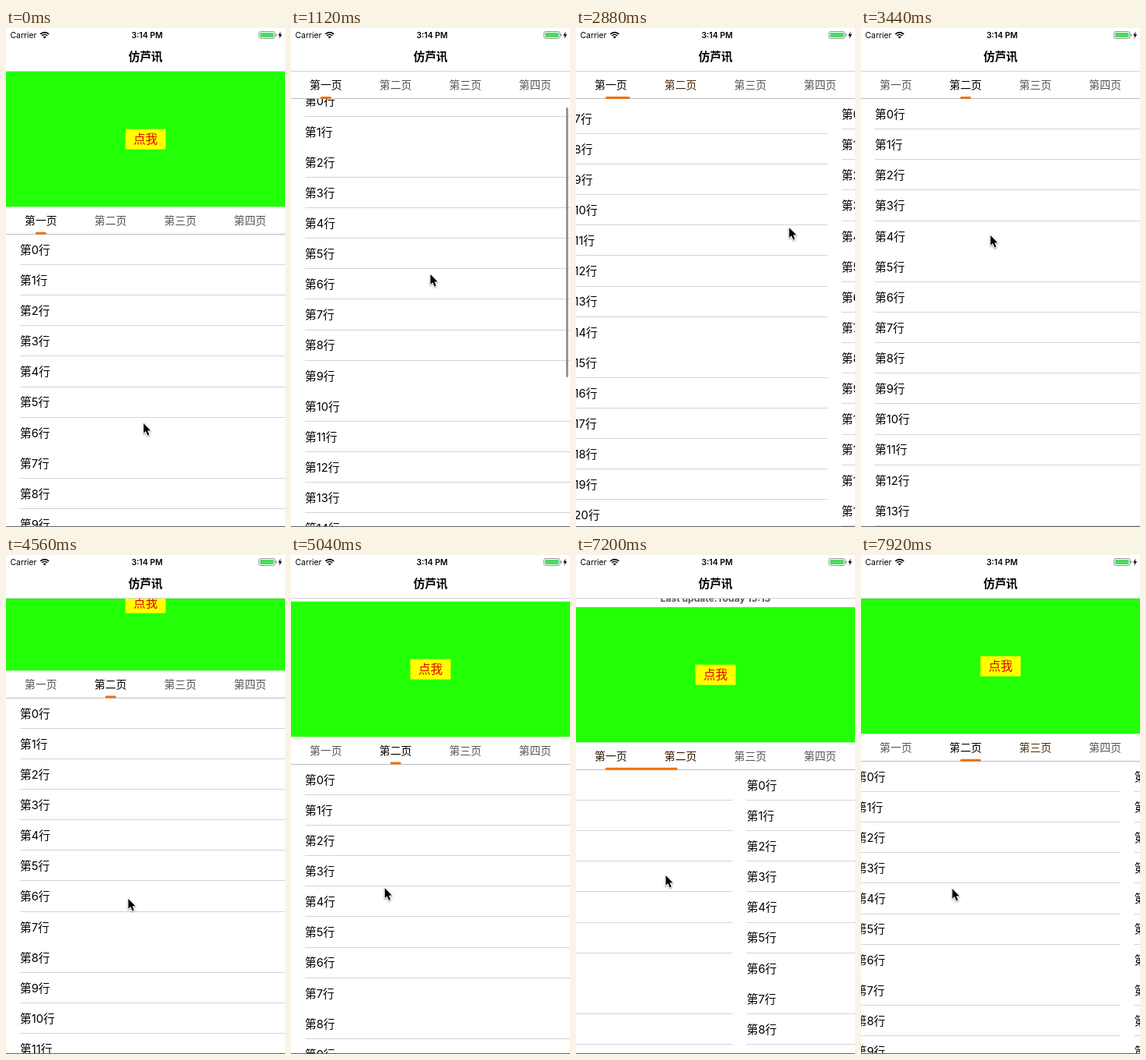
Recreate the animation shown at these times as an HTML page with a canvas. Size 359x640 px, loop 8000 ms.

```html
<!DOCTYPE html>
<html lang="zh-CN">
<head>
<meta charset="utf-8">
<style>
html, body { margin: 0; width: 100%; height: 100%; overflow: hidden; background: #fff; }
canvas { display: block; width: 359px; height: 640px; }
</style>
</head>
<body>
<canvas id="stage"></canvas>
<script>
const W = 359, H = 640, LOOP = 8000, STEP = 80;
const NAV = 55.8, HEAD = 173.75, TABS = 34.8, ROW = 39.13, ROWS = 30;
const FONT = '"Inter", "Noto Sans CJK SC", "Noto Sans CJK", sans-serif';
const TAB_NAMES = ['第一页', '第二页', '第三页', '第四页'];

const canvas = document.getElementById('stage');
const ctx = canvas.getContext('2d');
const dpr = window.devicePixelRatio || 1;
canvas.width = W * dpr;
canvas.height = H * dpr;

// Progress from 0 to 1 between two times, in several shapes.
const ramp = (t, a, b) => Math.min(1, Math.max(0, (t - a) / (b - a)));
const smooth = (t, a, b) => { const s = ramp(t, a, b); return s * s * (3 - 2 * s); };
const glide = (t, a, b) => 1 - (1 - ramp(t, a, b)) ** 3;
const bump = (t, a, b) => Math.sin(Math.PI * ramp(t, a, b));

// The header collapses first; what is left over scrolls the current list.
const SWITCH = 3400, FLING = 232;
function scroll(t) {
  if (t < SWITCH) return 349 * ramp(t, 160, 1920) + 93 * glide(t, 1920, 2640);
  return HEAD + FLING * smooth(t, 3560, 4000) - (HEAD + FLING) * ramp(t, 4000, 4700);
}

const overscroll = t => 12 * bump(t, 4700, 5080) + 11 * bump(t, 6900, 7500);

const pageAt = t => smooth(t, 2760, 3380) - smooth(t, 5860, 6180) +
  smooth(t, 6900, 7554) + 0.0705 * ramp(t, 7760, 7920);

// Stops of the mouse: time, x, y
const stops = [
  [160, 177, 507], [1920, 181.5, 157], [2760, 300, 255], [3380, 167.5, 261], [3560, 165, 276],
  [4000, 159, 117], [4700, 157, 522], [5680, 52.5, 249], [6000, 52.5, 249], [6900, 273, 398],
  [7200, 115.5, 411], [7760, 143, 427], [7920, 117.5, 428]
];

function pointerAt(t) {
  let [, x, y] = stops[0];
  for (let i = 1; i < stops.length; i++) {
    const [from, x0, y0] = stops[i - 1], [to, x1, y1] = stops[i];
    const k = ramp(t, from, to);
    x += (x1 - x0) * k;
    y += (y1 - y0) * k;
  }
  return [x, y];
}

function box(x, y, w, h, color) {
  ctx.fillStyle = color;
  ctx.fillRect(x, y, w, h);
}

function pill(x, y, w, h, r, color) {
  ctx.fillStyle = color;
  ctx.beginPath();
  ctx.roundRect(x, y, w, h, r);
  ctx.fill();
}

function label(str, x, cy, size, color, align = 'left', weight = 400) {
  ctx.font = `${weight} ${size}px ${FONT}`;
  ctx.textAlign = align;
  ctx.fillStyle = color;
  ctx.fillText(str, x, cy + size * 0.37);
}

// A hairline vanishes when it falls between two pixel rows.
function hairline(x, y) {
  const row = Math.floor(y);
  if (Math.abs(y - row - 0.26) > 0.06) box(x, row, W - 18, 1, '#d4d4d4');
}

function drawList(x, top, offset) {
  for (let i = 0; i < ROWS; i++) {
    const y = top + i * ROW - offset;
    if (y > H || y + ROW < top) continue;
    label(`第${i}行`, x + 18, y + 20, 14.74, '#000');
    hairline(x + 18, y + ROW);
  }
}

function drawLists(top, page, t) {
  const active = t < SWITCH ? 0 : 1;
  const offset = Math.max(0, scroll(t) - HEAD);
  ctx.save();
  ctx.beginPath();
  ctx.rect(0, top, W, H - top);
  ctx.clip();
  TAB_NAMES.forEach((_, i) => {
    const x = (i - page) * W;
    if (Math.abs(x) < W) drawList(x, top, i === active ? offset : 0);
  });
  const moving = scroll(t) !== scroll(t - 160);
  if (offset > 0 && moving) pill(354, top + 2.5 + offset * 0.543, 2.6, 346, 1.3, '#8a8a8a');
  ctx.restore();
}

function drawHeader(top) {
  if (top > NAV) label('Last update:Today 15:13', W / 2, top - 11.5, 12.1, '#5a5a5a', 'center', 700);
  box(0, top, W, HEAD, '#22ff06');
  box(W / 2 - 26, top + HEAD / 2 - 13, 52, 26, '#ffff00');
  label('点我', W / 2, top + HEAD / 2 - 0.5, 15.6, '#e00000', 'center');
}

function tabColor(weight) {
  if (weight > 0.999) return '#000';
  if (weight <= 0.001) return '#555';
  const k = 1 - weight;
  return `rgb(${85 * k}, ${46 * k}, ${6 * k})`;
}

function drawTabs(top, page) {
  const pitch = W / 4;
  box(0, top, W, TABS, '#fff');
  TAB_NAMES.forEach((name, i) => {
    const color = tabColor(Math.max(0, 1 - Math.abs(page - i)));
    label(name, pitch * (i + 0.5), top + 17.2, 13.87, color, 'center');
  });
  box(0, Math.floor(top + TABS), W, 1, '#bcbcbc');

  // The marker stretches ahead first, then its tail catches up.
  const from = Math.floor(page), p = page - from;
  const left = pitch * (from + 0.5 + Math.max(0, p * 2 - 1)) - 7;
  const right = pitch * (from + 0.5 + Math.min(1, p * 2)) + 7;
  pill(left, top + TABS - 2.7, right - left, 3, 1.5, '#f0700f');
}

function drawWifi(x, y) {
  ctx.strokeStyle = '#000';
  ctx.lineWidth = 1.7;
  for (const r of [4.9, 7.7]) {
    ctx.beginPath();
    ctx.arc(x, y, r, -Math.PI * 0.75, -Math.PI * 0.25);
    ctx.stroke();
  }
  ctx.fillStyle = '#000';
  ctx.beginPath();
  ctx.moveTo(x, y);
  ctx.arc(x, y, 2.8, -Math.PI * 0.75, -Math.PI * 0.25);
  ctx.fill();
}

function polygon(points) {
  ctx.beginPath();
  points.forEach(([x, y]) => ctx.lineTo(x, y));
  ctx.closePath();
}

function drawNav() {
  box(0, 0, W, 56, '#fff');
  box(0, 55, W, 1, '#d4d4d4');
  label('Carrier', 5.5, 9.5, 10.4, '#000');
  drawWifi(49.7, 13.4);
  label('3:14 PM', 181.5, 9.5, 10.4, '#000', 'center', 600);
  label('仿芦讯', W / 2, 37, 14.74, '#000', 'center', 600);

  ctx.strokeStyle = '#888';
  ctx.lineWidth = 0.9;
  ctx.beginPath();
  ctx.roundRect(325.5, 4.5, 20.5, 9, 2.2);
  ctx.stroke();
  pill(327, 6, 17.5, 6, 1, '#4cd964');
  pill(346.8, 7.3, 1.2, 3.4, 0.6, '#888');
  polygon([[353.6, 4.6], [350.2, 9.8], [352.4, 9.8], [351.4, 13.8], [355.2, 8.3], [352.9, 8.3]]);
  ctx.fillStyle = '#000';
  ctx.fill();
}

function drawPointer(x, y) {
  ctx.save();
  ctx.translate(x, y);
  polygon([[0, 0], [0, 12.8], [2.9, 10.1], [5.2, 15.4], [7.3, 14.5], [5.1, 9.4], [9, 9.2]]);
  ctx.shadowColor = 'rgba(0, 0, 0, 0.4)';
  ctx.shadowBlur = 2 * dpr;
  ctx.shadowOffsetY = dpr;
  ctx.strokeStyle = '#fff';
  ctx.lineWidth = 2;
  ctx.lineJoin = 'round';
  ctx.stroke();
  ctx.shadowColor = 'transparent';
  ctx.fillStyle = '#000';
  ctx.fill();
  ctx.restore();
}

function draw(t) {
  const top = NAV - Math.min(HEAD, scroll(t)) + overscroll(t);
  const page = pageAt(t);
  ctx.setTransform(dpr, 0, 0, dpr, 0, 0);
  box(0, 0, W, H, '#fff');
  drawLists(top + HEAD + TABS, page, t);
  drawHeader(top);
  drawTabs(top + HEAD, page);
  drawNav();
  box(0, H - 1, W, 1, '#666');
  drawPointer(...pointerAt(t));
}

let start = null;
function tick(now) {
  if (start === null) start = now;
  const t = (now - start) % LOOP;
  draw(Math.floor(t / STEP) * STEP);
  requestAnimationFrame(tick);
}
draw(0);
requestAnimationFrame(tick);
</script>
</body>
</html>
```
